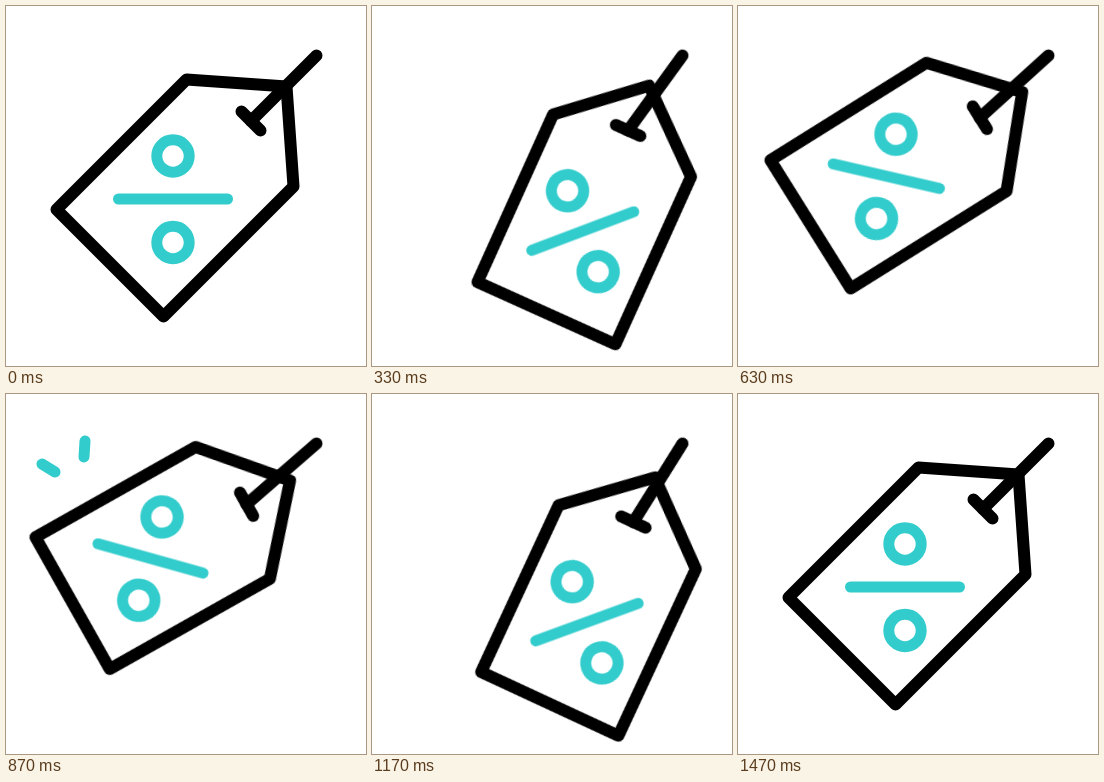
Write an HTML page that moves like this. It is 360 by 360 pixels and loops after 2 s.

```html
<!DOCTYPE html>
<html lang="en">
<head>
<meta charset="utf-8">
<title>Swinging price tag</title>
<style>
  html, body { margin: 0; width: 100%; height: 100%; overflow: hidden; background: #fff; }
  svg { display: block; width: 100%; height: 100%; fill: none; stroke-linecap: round; stroke-linejoin: round; }
  .ink { stroke: #000; stroke-width: 12; }
  .teal { stroke: #33cccc; stroke-width: 11; }

  /* 60 ticks per loop; each steps(n) spans n ticks. The small lead rounds ticks down to 10 ms. */
  .cord { transform-origin: 310.5px 49.5px; animation: cord 2s -4ms infinite; }
  .tag { transform-origin: 245px 115px; animation: tag 2s -4ms infinite; }
  .rays { animation: show 2s -4ms steps(1) infinite; }
  .rays path { animation: shoot 2s -4ms infinite; }

  @keyframes cord {
    0% { transform: rotate(0deg); animation-timing-function: steps(5); }
    8.333% { transform: rotate(-4.3deg); animation-timing-function: steps(6); }
    18.333% { transform: rotate(-10deg); animation-timing-function: steps(3); }
    23.333% { transform: rotate(-4.7deg); animation-timing-function: steps(5); }
    31.666% { transform: rotate(2.8deg); animation-timing-function: steps(4); }
    38.333% { transform: rotate(9.5deg); animation-timing-function: steps(3); }
    43.333% { transform: rotate(4deg); animation-timing-function: steps(6); }
    53.333% { transform: rotate(-8.8deg); animation-timing-function: steps(3); }
    58.333% { transform: rotate(-13deg); animation-timing-function: steps(9); }
    73.333%, 100% { transform: rotate(0deg); }
  }
  @keyframes tag {
    0% { transform: rotate(0deg); animation-timing-function: steps(5); }
    8.333% { transform: rotate(-7.8deg); animation-timing-function: steps(3); }
    13.333% { transform: rotate(-11deg); animation-timing-function: steps(3); }
    18.333% { transform: rotate(-12deg); animation-timing-function: steps(3); }
    23.333% { transform: rotate(-8deg); animation-timing-function: steps(5); }
    31.666% { transform: rotate(10.2deg); animation-timing-function: steps(4); }
    38.333% { transform: rotate(12.3deg); animation-timing-function: steps(3); }
    43.333% { transform: rotate(11.6deg); animation-timing-function: steps(6); }
    53.333% { transform: rotate(-9.5deg); animation-timing-function: steps(3); }
    58.333% { transform: rotate(-7.1deg); animation-timing-function: steps(9); }
    73.333%, 100% { transform: rotate(0deg); }
  }
  @keyframes show {
    0%, 55%, 100% { opacity: 0; }
    36.666% { opacity: 1; }
  }
  @keyframes shoot {
    0%, 36.666% { stroke-dasharray: 0 200; stroke-dashoffset: 0; animation-timing-function: steps(5); }
    45% { stroke-dasharray: 100 200; stroke-dashoffset: 0; animation-timing-function: steps(6); }
    55%, 100% { stroke-dasharray: 0 200; stroke-dashoffset: -100; }
  }
</style>
</head>
<body>
<svg viewBox="0 0 360 360">
  <g class="cord">
    <g class="tag">
      <path class="ink" d="M180.5 73.5 280.5 80.5 287.5 180.5 157.5 310.5 50.5 203.5Z"/>
      <path class="ink" d="M235.5 105.5 254.5 124.5"/>
      <g class="teal">
        <circle cx="167" cy="150" r="16.2"/>
        <path d="M112.5 193H221.5"/>
        <circle cx="167" cy="236.5" r="16.2"/>
      </g>
    </g>
    <path class="ink" d="M310.5 49.5 245 115"/>
  </g>
  <g class="rays teal">
    <path pathLength="100" d="M49 78 32.7 68"/>
    <path pathLength="100" d="M78 63 79.25 43"/>
  </g>
</svg>
</body>
</html>
```
